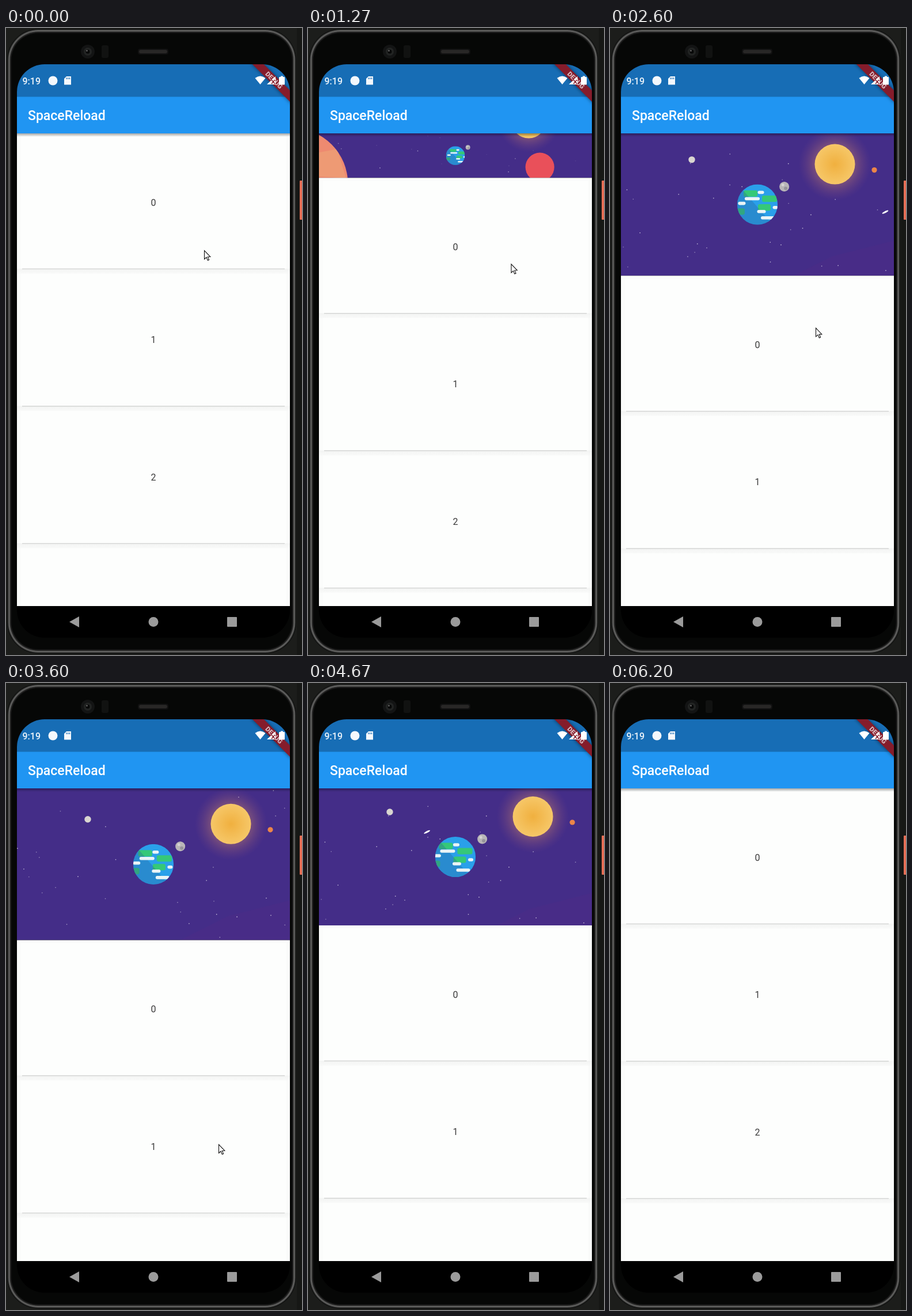
These frames come from a looping animation (514 by 1089 pixels, 6.39 s). An HTML page with a canvas:

```html
<!DOCTYPE html>
<html lang="en">
<head>
<meta charset="utf-8">
<title>Pull to refresh</title>
<style>
html, body { margin: 0; width: 100%; height: 100%; overflow: hidden; background: #1c1d1b; }
canvas { display: block; }
</style>
</head>
<body>
<canvas id="stage" width="514" height="1089"></canvas>
<script>
const c = document.getElementById('stage').getContext('2d');
const TAU = Math.PI * 2, LOOP = 6390, STEP = 200 / 3, LAST = 93;
const LEFT = 19, RIGHT = 493, WIDTH = RIGHT - LEFT, TOP = 183, BOTTOM = 1004, MID = 256;

// pointer: time in ms, x, y; the drag begins at PRESS_Y
const POINTER = [[0, 344, 386], [250, 347, 359], [800, 352, 395.6], [1800, 353, 426.5],
  [2100, 356, 545], [2600, 357, 520.6], [3300, 369, 801]];
const PRESS_Y = 359, REST = 238;
const RELEASE = 3300, SETTLED = 3980, CLOSE = 5200, CLOSED = 6190, POINTER_END = 4250;

// patches on the earth: x, y, width
const LAND = [[-12, -19, 24], [21, -10, 26], [12, 5, 22], [-32, 12, 20]];
const CLOUDS = [[6, -21, 11], [-9, -10, 26], [-27, -2, 13], [31, 5, 9], [7, 12, 15], [18, 23, 24]];

const clamp = x => Math.max(0, Math.min(1, x));
const smooth = x => x * x * (3 - 2 * x);
const progress = (t, from, to) => clamp((t - from) / (to - from));

function pointerAt(t) {
  const i = POINTER.findIndex(k => k[0] > t);
  if (i < 0) return POINTER[POINTER.length - 1].slice(1);
  const a = POINTER[i - 1], b = POINTER[i], u = smooth(progress(t, a[0], b[0]));
  return [1, 2].map(n => a[n] + (b[n] - a[n]) * u);
}

// height of the revealed header
function pullAt(t) {
  if (t < POINTER[1][0]) return 0;
  if (t >= CLOSE) return REST * (1 - smooth(progress(t, CLOSE, CLOSED)));
  const d = 1.53 * (pointerAt(Math.min(t, RELEASE))[1] - PRESS_Y);
  const pulled = Math.min(d, 182 + d * .3);
  return t < RELEASE ? pulled : REST + (pulled - REST) * (1 - progress(t, RELEASE, SETTLED)) ** 3;
}

function random(seed) {
  return () => (seed = seed * 16807 % 2147483647) / 2147483647;
}

function rect(x, y, w, h, color) {
  c.fillStyle = color;
  c.fillRect(x, y, w, h);
}

function round(x, y, w, h, r, color) {
  c.beginPath();
  c.roundRect(x, y, w, h, r);
  c.fillStyle = color;
  c.fill();
}

function disc(x, y, r, color) {
  c.beginPath();
  c.arc(x, y, r, 0, TAU);
  c.fillStyle = color;
  c.fill();
}

function poly(points, color) {
  c.beginPath();
  points.forEach(p => c.lineTo(...p));
  c.closePath();
  c.fillStyle = color;
  c.fill();
}

function text(s, x, y, font, color, align = 'left') {
  c.font = font + ' Roboto, sans-serif';
  c.textAlign = align;
  c.fillStyle = color;
  c.fillText(s, x, y);
}

function radial(x, y, r, from, inner, outer) {
  const g = c.createRadialGradient(x, y, r * from, x, y, r);
  g.addColorStop(0, inner);
  g.addColorStop(1, outer);
  return g;
}

function fade(y, h, from, to) {
  const g = c.createLinearGradient(0, y, 0, y + h);
  g.addColorStop(0, from);
  g.addColorStop(1, to);
  rect(LEFT, y, WIDTH, h, g);
}

function clipped(path, draw) {
  c.save();
  c.beginPath();
  path();
  c.clip();
  draw();
  c.restore();
}

function phone() {
  rect(0, 0, 514, 1089, '#1c1d1b');
  rect(505, 0, 9, 1089, '#161715');
  round(510, 265, 6, 68, 1, '#e66e55');
  // nested outlines, from the rim inwards
  ['#111211', '#4c4c4b', '#666665', '#2c2c2b', '#151515', '#060706'].forEach((color, i) =>
    round(2 + i * 1.5, 1.5 + i * 1.5, 502 - i * 3, 1085 - i * 3, 54 - i * 1.5, color));
  round(229, 36, 53, 10, 4, '#111');
  round(231, 38, 49, 6, 3, '#282726');
  disc(142, 41, 12, '#131414');
  disc(142, 41, 7, '#222423');
  disc(142, 41, 3.5, '#080909');
  disc(140.5, 39.5, 1.2, '#777');
  round(166, 30, 12, 22, 3, '#111211');
  round(LEFT, 63, WIDTH, 996, 48, '#000');
}

function banner() {
  c.save();
  c.translate(RIGHT, 63);
  c.rotate(Math.PI / 4);
  c.shadowColor = 'rgba(0,0,0,.5)';
  c.shadowBlur = 6;
  rect(-50, 32, 100, 14, '#851c2b');
  c.shadowBlur = 0;
  text('DEBUG', 0, 43, '900 11.5px', '#d9b9bf', 'center');
  c.restore();
}

function statusIcons() {
  text('9:19', 28.5, 97.5, '500 16px', '#eef5fb');
  disc(81.5, 91.5, 8, '#f4f8fc');
  poly([[105, 84], [113, 84], [113, 98.5], [101, 98.5], [101, 88]], '#f4f8fc');
  for (let x = 104.5; x < 112; x += 2.7) rect(x, 86, 1.2, 3, '#176db5');
  c.beginPath();
  c.moveTo(441.5, 98);
  c.lineTo(432.5, 87);
  c.quadraticCurveTo(441.5, 80, 450.5, 87);
  c.fillStyle = '#fff';
  c.fill();
  poly([[453, 98], [468, 98], [468, 84]], '#fff');
  round(474, 85, 10, 13.5, 1, '#fff');
  rect(477, 83.5, 4, 2, '#fff');
  // no-signal mark
  c.beginPath();
  c.moveTo(461, 90);
  c.lineTo(467, 97);
  c.moveTo(467, 90);
  c.lineTo(461, 97);
  c.lineWidth = 1.6;
  c.strokeStyle = '#851c2b';
  c.stroke();
}

function appBar() {
  rect(LEFT, 63, WIDTH, 57, '#176db5');
  rect(LEFT, 119.5, WIDTH, TOP - 119.5, '#2095f2');
  text('SpaceReload', 38, 160, '500 23px', '#fff');
  fade(TOP, 6, 'rgba(0,0,0,.34)', 'rgba(0,0,0,0)');
  banner();
  statusIcons();
}

function list(h) {
  rect(LEFT, TOP + h, WIDTH, BOTTOM - TOP - h, '#fbfcfb');
  for (let i = 0; i < 4; i++) {
    const y = TOP + h + 5 + i * 238.5;
    rect(26, y, 460, 230, '#fdfefd');
    fade(y + 230, 9, '#f3f4f3', '#f9faf9');
    rect(28, y + 229.7, 456, 1.4, '#d3d4d3');
    text(i, MID, y + 120.5, '400 16px', '#3a3a3a', 'center');
  }
}

function earth(r, t) {
  const drift = (2.6 - t) * 2.2;
  const pills = (rows, h, color) => rows.forEach(([x, y, w]) =>
    round(x - w / 2 + drift, y - h / 2, w, h, 3, color));
  c.save();
  c.scale(r / 35, r / 35);
  clipped(() => c.arc(0, 0, 35, 0, TAU), () => {
    rect(-35, -35, 70, 70, '#2aa0ea');
    pills(LAND, 11, '#35c878');
    poly([[-26, -26], [22, 30], [0, 40], [-40, 40], [-40, -26]], 'rgba(40,95,150,.32)');
    pills(CLOUDS, 5.5, '#eaf4f6');
  });
  disc(46.5, -31, 8.5, '#b9b6b8');
  disc(44, -34, 2.5, '#d5d3d3');
  disc(49, -28, 3, '#96939b');
  c.restore();
}

// two star fields that twinkle in turn
function stars(t) {
  const glow = .5 + .5 * Math.cos(TAU * (t - 2.6) / 2.07);
  [1 - glow, glow].forEach((alpha, n) => {
    const next = random(41 + n * 900);
    for (let i = 0; i < 30; i++) {
      const x = (next() - .5) * WIDTH, y = (next() - .5) * 264;
      c.globalAlpha = alpha * (.35 + .45 * next());
      rect(x, y, 1.4, 1.4, '#fff');
    }
  });
  c.globalAlpha = 1;
}

function comet(x, y, at, t) {
  const d = t - at;
  if (Math.abs(d) > .2) return;
  c.beginPath();
  c.ellipse(x - d * 200, y + d * 100, 6, 1.5, -.47, 0, TAU);
  c.fillStyle = '#fff';
  c.fill();
}

function scene(h, t) {
  const zoom = Math.min(1, (h + 29) / 229), near = zoom * 2.7;
  const far = .74 + .26 * zoom, wide = .9 + .1 * zoom;
  rect(LEFT, TOP, WIDTH, h, '#442d88');
  c.save();
  c.translate(MID, TOP + h / 2);
  poly([[30, 140], [130, 90], [240, 62], [240, 140]], 'rgba(90,40,130,.2)');
  stars(t);

  const sx = 134.5 * wide, sy = -70 * far, sr = 35 * far;
  disc(sx, sy, sr * 1.8, radial(sx, sy, sr * 1.8, .5, 'rgba(225,145,100,.38)', 'rgba(150,85,120,0)'));
  disc(sx, sy, sr, radial(sx, sy, sr, 0, '#f0b03f', '#f6c768'));
  disc(-114 * wide, -78 * far, 5.7 * far, '#d9d6d0');
  disc(203 * wide, -60 * far, 4.6 * far, '#ec8548');

  comet(222, 13, 2.6, t);
  comet(-50, -43, 4.67, t);

  // close planets fly outwards as the view zooms in
  c.save();
  c.scale(near, near);
  clipped(() => c.arc(-226, 39, 77, 0, TAU), () => {
    rect(-303, -38, 154, 154, '#ee8a70');
    poly([[-303, 17], [-164, -9], [-149, 39], [-149, 116], [-303, 116]], '#ee9a74');
    poly([[-303, 24], [-149, 31], [-149, 116], [-303, 116]], '#e9846c');
  });
  disc(117, 11.5 + 22 * (1 - 1 / near), 20, '#e9505a');
  c.restore();
  earth(13 * near, t);
  c.restore();
}

function navBar() {
  poly([[127, 1022], [127, 1041], [110, 1031.5]], '#9b9b9b');
  disc(MID, 1031.5, 8.5, '#9b9b9b');
  round(384, 1023, 17, 17, 1, '#9b9b9b');
}

function pointer(t) {
  if (t > POINTER_END) return;
  c.save();
  c.translate(...pointerAt(t));
  c.lineWidth = 1.1;
  c.strokeStyle = '#111';
  poly([[.5, .5], [.5, 15.5], [4, 12.3], [6.3, 17.6], [8.6, 16.6], [6.3, 11.5], [10.8, 11.3]], '#fff');
  c.stroke();
  c.restore();
}

function draw(now) {
  const t = Math.min(LAST, Math.floor((now % LOOP + 4) / STEP)) * STEP;
  const h = pullAt(t);
  phone();
  clipped(() => c.roundRect(LEFT, 63, WIDTH, BOTTOM - 63, [48, 48, 0, 0]), () => {
    if (h > 0) clipped(() => c.rect(LEFT, TOP, WIDTH, h), () => scene(h, t / 1000));
    list(h);
    appBar();
  });
  navBar();
  pointer(t);
}

const start = performance.now();
function tick() {
  draw(performance.now() - start);
  requestAnimationFrame(tick);
}
tick();
</script>
</body>
</html>
```
